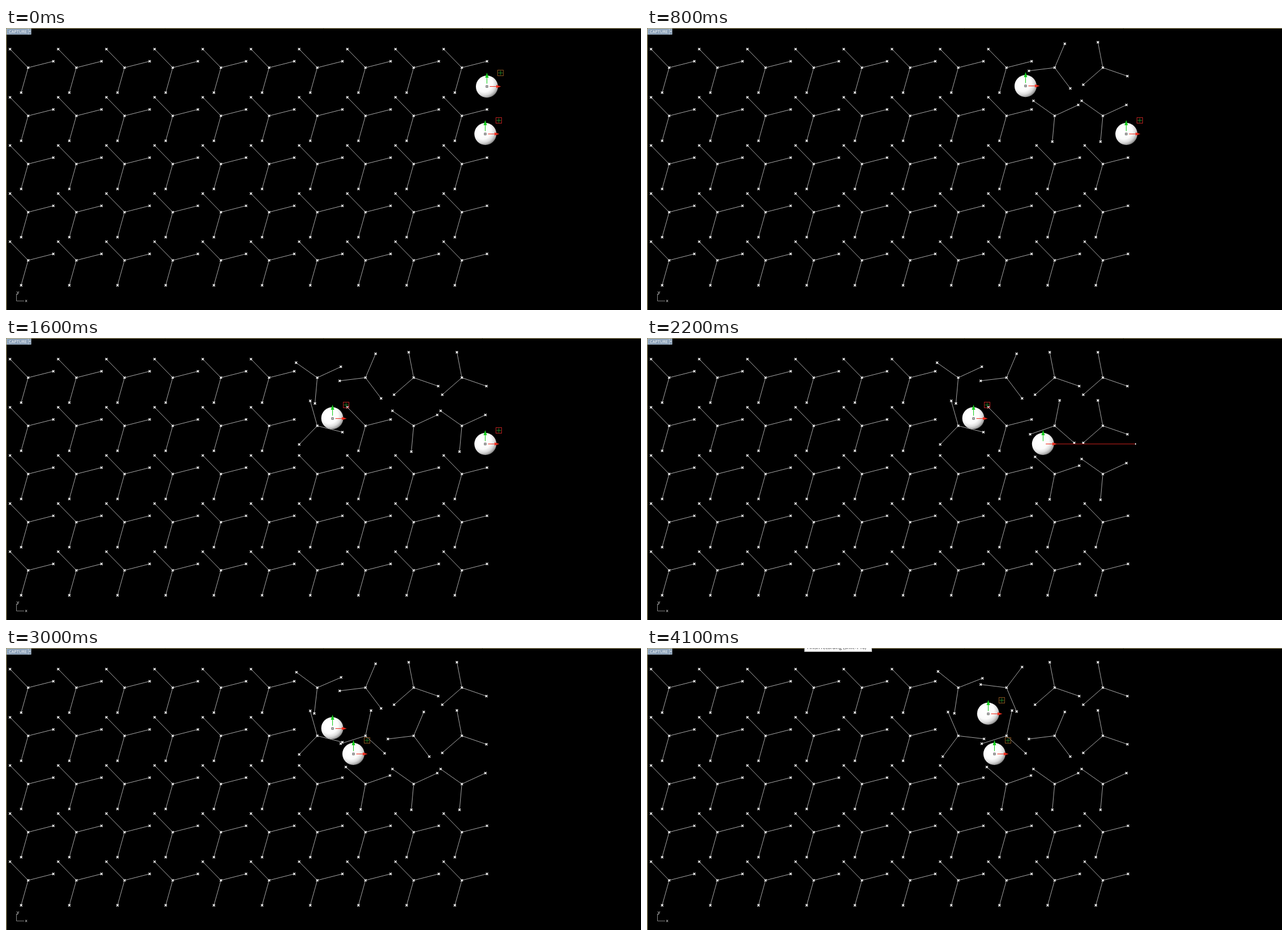
Write an HTML page with a canvas that moves like this. It is 1123x499 px and loops after 4200 ms.

```html
<!DOCTYPE html>
<html lang="en">
<head>
<meta charset="utf-8">
<title>Pinwheels</title>
<style>
  html, body { margin: 0; width: 100%; height: 100%; overflow: hidden; background: #000; }
  canvas { display: block; }
</style>
</head>
<body>
<canvas id="stage" width="1123" height="499"></canvas>
<script>
const ctx = document.getElementById('stage').getContext('2d');
const LOOP = 4200, STEP = 100;
const COLS = 10, ROWS = 5, PITCH = 85.22, ARM = 45.9, REST = -14.3, RADIUS = 19.5;
const FONT = '"Open Sans", "Noto Sans", sans-serif';
const RED = '#b42020', BROWN = '#85501f';

// Path points are [time, x, y]; the columns say where wheels recoil or get nudged
const upper = {
  row: 0, recoilFrom: 8, nudgeFrom: 8,
  path: [[100, 850.5, 103.8], [800, 669.5, 102.8], [1300, 580, 100], [1500, 577, 142],
    [3000, 577, 142], [3400, 587.5, 110], [3500, 587.5, 110], [3900, 603.3, 116.3]]
};
const lower = {
  row: 1, recoilFrom: 9, nudgeFrom: 7,
  path: [[1800, 847.8, 187.5], [2200, 700.3, 187.5], [2600, 623.2, 187.5], [2700, 614.4, 187.5]]
};

// Small late pushes
const taps = [
  { col: 6, row: 0, start: 1200, angle: -10.5 },
  { col: 6, row: 0, start: 2900, angle: 3.5 },
  { col: 6, row: 1, start: 1300, angle: 28.5 },
  { col: 6, row: 1, start: 3100, angle: -7.5 },
  { col: 7, row: 0, start: 3600, angle: 14 }
];

const clamp = (v, lo, hi) => Math.min(hi, Math.max(lo, v));
const colX = c => 39.2 + c * PITCH;
const rowY = r => 70.2 + r * PITCH;

function at(path, t, i) {
  const n = path.findIndex(p => p[0] >= t);
  if (n < 0) return path[path.length - 1][i];
  if (n === 0) return path[0][i];
  const a = path[n - 1], b = path[n];
  return a[i] + (b[i] - a[i]) * (t - a[0]) / (b[0] - a[0]);
}

// Furthest left the ball has been, measured from a column
function reach(ball, c, t) {
  const past = ball.path.filter(p => p[0] <= t).map(p => p[1]);
  return Math.min(at(ball.path, t, 1), ...past) - colX(c);
}

// A ball below a wheel drags its lower arm until it slips off
function sweep(ball, c, t) {
  const dx = reach(ball, c, t);
  const recoil = c >= ball.recoilFrom ? clamp(6 * (-100 - dx), 0, 34) : 0;
  return clamp(2 * (7 - dx), 0, 67.3) - recoil;
}

// A ball above a wheel only brushes its upper arm
function nudge(ball, c, t) {
  return c < ball.nudgeFrom ? 0 : -10.5 * clamp((-12 - reach(ball, c, t)) / 20, 0, 1);
}

function turnOf(c, r, t) {
  let turn = 0;
  for (const ball of [upper, lower]) {
    if (r === ball.row) turn = sweep(ball, c, t) || turn;
    if (r === ball.row + 1) turn = nudge(ball, c, t);
  }
  for (const tap of taps)
    if (tap.col === c && tap.row === r) turn += tap.angle * clamp((t - tap.start) / 250, 0, 1);
  return turn;
}

function line(color, width, ...pts) {
  ctx.strokeStyle = color;
  ctx.lineWidth = width;
  ctx.beginPath();
  for (let i = 0; i < pts.length; i += 2) ctx.lineTo(pts[i], pts[i + 1]);
  ctx.stroke();
}

function box(color, x, y, w, h) {
  ctx.strokeStyle = color;
  ctx.lineWidth = 1;
  ctx.strokeRect(x, y, w, h);
}

function triangle(color, ...p) {
  ctx.fillStyle = color;
  ctx.beginPath();
  for (let i = 0; i < 6; i += 2) ctx.lineTo(p[i], p[i + 1]);
  ctx.fill();
}

function mark(x, y) {
  line('#fff', 1.4, x - 1.9, y - 1.9, x + 1.9, y + 1.9);
  line('#fff', 1.4, x - 1.9, y + 1.9, x + 1.9, y - 1.9);
}

function wheel(x, y, turn) {
  const tips = [0, 120, 240].map(a => {
    const r = (REST + turn + a) * Math.PI / 180;
    return [x + ARM * Math.cos(r), y + ARM * Math.sin(r)];
  });
  tips.forEach(p => line('#bcbcbc', .9, x, y, ...p));
  tips.forEach(p => mark(...p));
  mark(x, y);
}

function sphere(x, y) {
  const g = ctx.createRadialGradient(x - 5, y - 6, 4, x - 5, y - 6, 27.5);
  g.addColorStop(0, '#fff');
  g.addColorStop(.48, '#fbfbfb');
  g.addColorStop(.72, '#dcdcdc');
  g.addColorStop(.9, '#a6a6a6');
  g.addColorStop(1, '#666');
  ctx.fillStyle = g;
  ctx.beginPath();
  ctx.arc(x, y, RADIUS, 0, 2 * Math.PI);
  ctx.fill();
}

function handles(x, y, pulled) {
  const red = '#f03020', green = '#18d020';
  if (pulled) {
    line('#c4201c', 1, x + 5, y, 864, y);
    ctx.fillStyle = '#fff';
    ctx.fillRect(863, y - 1, 2, 2);
  } else {
    box('#444', x - 1.5, y - 1.5, 3, 3);
  }
  line(green, 1.1, x, y - 5, x, y - 17);
  triangle(green, x, y - 24.5, x - 3, y - 15.5, x + 3, y - 15.5);
  line(red, 1.1, x + 5, y, x + 18, y);
  triangle(red, x + 25, y, x + 16.5, y - 2.8, x + 16.5, y + 2.8);
}

function grip(x, y, color) {
  line('#1d7a22', 1, x - 4, y, x + 4, y);
  line('#1d7a22', 1, x, y - 4, x, y + 4);
  box(color, x - 5, y - 5, 10, 10);
}

function drawBall(ball, t, gripColor, pulled) {
  const x = at(ball.path, t, 1), y = at(ball.path, t, 2);
  const px = Math.floor(x) + .5, py = Math.floor(y) + .5;
  sphere(x, y);
  handles(px, py, pulled);
  if (gripColor) grip(px + 24, py - 24, gripColor);
}

function text(str, x, y, size, color) {
  ctx.font = size + 'px ' + FONT;
  ctx.fillStyle = color;
  ctx.fillText(str, x, y);
}

function chrome(t) {
  line('#aea272', 1, .5, 499, .5, .5, 1123, .5);
  ctx.fillStyle = '#8aa0b8';
  ctx.fillRect(1, 1, 43.5, 10.5);
  box('#a3b5c8', 1.5, 1.5, 42.5, 9.5);
  text('CAPTURE', 5, 9, 7.4, '#fff');
  line('#c5d0dc', .8, 39.5, 1, 39.5, 11.5);
  triangle('#fff', 40.7, 5.2, 43.5, 5.2, 42.1, 7.2);

  line('#999', .9, 18.5, 470, 18.5, 483, 32, 483);
  text('y', 19, 470, 8, '#fff');
  text('x', 33.5, 485, 8, '#fff');

  if (t >= 4000) {
    ctx.fillStyle = '#fff';
    ctx.fillRect(278, 0, 120, 6.5);
    box('#999', 278.5, -1, 119, 7.5);
    text('Finish recording (Shift+F10)', 283, 2, 8.3, '#333');
  }
}

function draw(t) {
  ctx.fillStyle = '#000';
  ctx.fillRect(0, 0, 1123, 499);
  for (let r = 0; r < ROWS; r++)
    for (let c = 0; c < COLS; c++) wheel(colX(c), rowY(r), turnOf(c, r, t));

  const upperGrip = t < 200 || t >= 3900 ? BROWN : t >= 1600 && t < 3000 ? RED : null;
  const lowerGrip = t < 1900 ? RED : t >= 2800 ? BROWN : null;
  drawBall(upper, t, upperGrip, false);
  drawBall(lower, t, lowerGrip, t >= 1900 && t < 2700);
  chrome(t);
}

const start = performance.now();
function tick() {
  const t = (performance.now() - start) % LOOP;
  draw(Math.floor(t / STEP) * STEP);
  requestAnimationFrame(tick);
}
tick();
</script>
</body>
</html>
```
